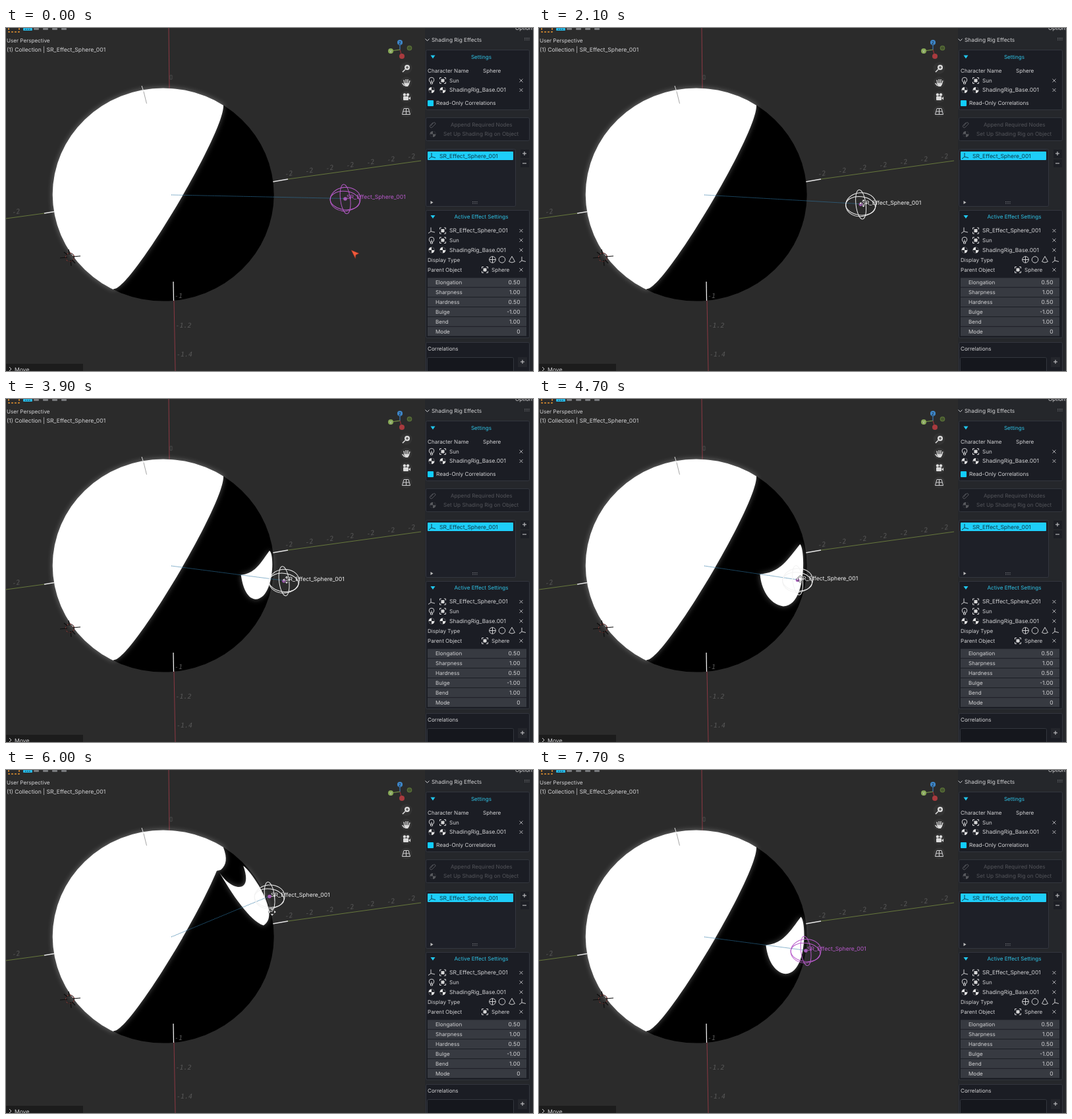
Animation, 800 px wide and 522 px high, one loop 7800 ms. Source, as an HTML page:

```html
<!DOCTYPE html>
<html lang="en">
<head>
<meta charset="utf-8">
<title>Shading rig viewport</title>
<style>
html, body { margin: 0; width: 100%; height: 100%; overflow: hidden; background: #2b2b2b; }
svg { display: block; width: 800px; height: 522px; }
text { font-family: Inter, "Open Sans", sans-serif; fill: #d2d2d4; text-rendering: geometricPrecision; white-space: pre; }
.tick { font: italic 10px "DejaVu Sans Mono", monospace; fill: #575757; }
.line { fill: none; stroke: #d0d0d2; stroke-width: 1; }
.dim { opacity: .3; }
.title { fill: #2fc3e6; text-anchor: middle; }
.dark { fill: #0b3947; }
.glow { filter: drop-shadow(0 0 4px rgba(255, 255, 255, .35)); }
</style>
</head>
<body>
<svg id="stage" viewBox="0 0 800 522" xmlns="http://www.w3.org/2000/svg"></svg>
<script>
const LOOP = 7800, STEP = 100, GRAB = 900, DROP = 7500;
const WHITE = '#f2f2f2', MAGENTA = '#b85acb';
const PIVOT = { x: 251, y: 254 };

// --- drawing helpers, each returns markup ---
const text = (x, mid, str, size = 8.1, extra = '') =>
  `<text x="${x}" y="${mid + 2.9}" font-size="${size}" ${extra}>${str}</text>`;
const rect = (x, y, w, h, fill, extra = '') =>
  `<rect x="${x}" y="${y}" width="${w}" height="${h}" fill="${fill}" ${extra}/>`;
const path = (d, extra = '') => `<path d="${d}" class="line" ${extra}/>`;
const stroke = (d, color, width = 1, extra = '') =>
  `<path d="${d}" fill="none" stroke="${color}" stroke-width="${width}" ${extra}/>`;
const fill = (d, color) => `<path d="${d}" fill="${color}"/>`;
const disc = (x, y, r, color) => `<circle cx="${x}" cy="${y}" r="${r}" fill="${color}"/>`;
const ring = (x, y, r) => `<circle cx="${x}" cy="${y}" r="${r}" class="line"/>`;
const box = (y, h, x = 637, w = 158, color = '#1b1d24') =>
  rect(x + .5, y + .5, w - 1, h - 1, color, 'rx="2" stroke="#33363e"');

const cross = y => path(`M779.5 ${y - 2.5}l5 5m0-5l-5 5`, 'opacity=".8"');
const plus = (x, y) => path(`M${x - 3} ${y}h6m-3-3v6`);
const grip = (x, y) => stroke(`M${x} ${y}h8m-8 2.5h8`, '#7c7e82', 1.2, 'stroke-dasharray="1.2 1.2"');
const bulb = (x, y) => ring(x, y - 1, 3.8) + path(`M${x - 1.5} ${y + 3}v2h3v-2m-1.5 0v-4`);
const object = (x, y) => rect(x - 2.5, y - 2.5, 5, 5, '#d8d8d8') +
  path(`M${x - 4.5} ${y - 2}v-2.5h2.5m4 0h2.5v2.5m0 4v2.5h-2.5m-4 0h-2.5v-2.5`);
const material = (x, y) => disc(x, y, 4.5, '#e2e2e2') +
  fill(`M${x} ${y}v-4.5a4.5 4.5 0 0 1 4.5 4.5zv4.5a4.5 4.5 0 0 1-4.5-4.5z`, '#24262c');
const axes = (x, y, color = '#d0d0d2') => stroke(`M${x - 1} ${y - 5}v6l-4 3m4-3l6 1.5`, color);
const tick = (x, y, label, turn = 0) =>
  `<text class="tick" transform="translate(${x} ${y}) rotate(${turn})">${label}</text>`;

function viewport() {
  return rect(0, 0, 800, 522, '#2b2b2b') +
    stroke('M247 0L248 92', '#8c3843') + stroke('M255 414L257 522', '#8c3843') +
    stroke('M0 290L58 282M428 230L630 202', '#66773c') +
    stroke('M58 282L73 279.5M405 234L428 230', '#e8e8e8', 1.3) +
    stroke('M249 72h3v6h-3z', '#4a4a4a');
}

function sphere() {
  const lit = 'M330 118C331 162 187 402 163.500 397L150 430H50V70H330Z';
  return `<ellipse cx="238.7" cy="253.5" rx="168" ry="162"/>
    <clipPath id="ball"><ellipse cx="238.7" cy="253.5" rx="168" ry="162"/></clipPath>
    <g class="glow"><g clip-path="url(#ball)" fill="#fff">
    <path d="${lit}"/><path id="bulge"/><path id="blob"/></g></g>` +
    stroke('M206 88L209 97', '#ddd') + stroke('M209 97L213.500 115', '#a5a5a5') +
    stroke('M254 386L254.500 415', '#f0f0f0', 1.3);
}

function ticks() {
  let s = tick(10, 284, '-2', -10);
  for (let i = 0; i < 3; i++) s += tick(256 + i * 1.5, 411 + i * 44.5, i ? '-1.' + i * 2 : '-1');
  for (let x = 424; x < 620; x += 31) s += tick(x, 226 - (x - 424) * .14, '-2', -10);
  return s;
}

function cursor3d() {
  return stroke('M97 342.500a6.500 6.500 0 1 1-.1 0', '#3a2626', 1.2) +
    stroke('M97 342.500a6.500 6.500 0 1 1-.1 0', '#a8443e', 1, 'stroke-dasharray="2 4"') +
    stroke('M82 350L93 349M101 348L113 347M95 337L96 345M98 353L99 362M88 341l5 4M100 353l5 5', '#0c0c0c', 1.2);
}

function overlay() {
  let s = text(1, 19.5, 'User Perspective') + text(1, 33, '(1) Collection | SR_Effect_Sphere_001', 8.6);
  s += stroke('M4 0V6H20V0', '#e09030', 1.5, 'stroke-dasharray="3 2"');
  s += rect(26, 0, 14, 4, '#27b9e6', 'rx="1"') + stroke('M29 2h8', '#123', 1, 'stroke-dasharray="1.5 1.5"');
  for (let x = 42; x < 90; x += 14) s += rect(x, 0, 8, 3, '#77797c', 'rx="1"');

  // axis gizmo
  s += stroke('M598 33V22', '#3a78b8', 1.2) + stroke('M598 33L584 35', '#7f9f4a', 1.2) + stroke('M598 33L601 43', '#8c3238', 1.2);
  s += disc(612.5, 30.5, 3.8, '#5f7a3a') + disc(612.5, 30.5, 2.8, '#46562f') +
    disc(598, 22, 4, '#3f88cc') + disc(584, 35, 4, '#86a856') + disc(601, 43, 4, '#a83a3e');
  s += text(598, 22, 'Z', 6, 'text-anchor="middle" style="fill:#111"') + text(584, 35, 'Y', 6, 'text-anchor="middle"');

  // navigation buttons
  for (let y = 61; y < 130; y += 22) s += disc(607.5, y, 9, '#333');
  s += disc(609, 60, 4, '#dcdcdc') + stroke('M606 63l-4 4', '#dcdcdc', 1.6) + stroke('M607 60h4m-2-2v4', '#333');
  s += fill('M604 84h8v2l-2 3h-4z', '#dcdcdc') +
    stroke('M605 85l-1-6M607.2 85v-7M609.5 85l.5-7M611.5 85l1.5-5M605 88l-3.5-4', '#dcdcdc', 1.4);
  s += disc(605, 101.5, 2.2, '#dcdcdc') + disc(610, 101.5, 2.2, '#dcdcdc') +
    rect(603, 104, 8, 6, '#dcdcdc', 'rx="1"') + fill('M611 107l3-2.5v5z', '#dcdcdc');
  s += path('M604 122.5h7l2.5 9h-12zM602.8 127h9.6M607.5 122.5v9');

  return s + rect(0, 511, 117, 11, '#1c1c1c') + path('M5 516l3 3-3 3') + text(13, 520, 'Move', 8.6);
}

function panel() {
  const name = 'SR_Effect_Sphere_001', base = 'ShadingRig_Base.001';
  const title = (y, label) => fill(`M644.5 ${y - 2.5}h7l-3.5 5z`, '#20c8f0') + text(721.5, y, label, 8.1, 'class="title"');
  const sun = y => bulb(646, y) + object(663, y) + text(673, y, 'Sun') + cross(y);
  const mat = y => material(646, y) + material(663, y) + text(673, y, base, 8.5) + cross(y);

  let s = rect(636, 0, 164, 522, '#25272b') + text(773, 0, 'Options', 8.2);
  s += path('M636.5 16.5l3 3 3-3') + text(646, 18.5, 'Shading Rig Effects', 8.3) + grip(787, 15.5);

  s += box(33, 92) + title(44, 'Settings');
  s += text(640, 65, 'Character Name') + text(724, 65, 'Sphere') + sun(80) + mat(94.5);
  s += rect(640, 110, 9, 9, '#12cdff', 'rx="1"') + text(653, 114.5, 'Read-Only Correlations', 8.2);

  s += box(136, 36) + '<g class="dim">' + text(675, 147, 'Append Required Nodes') +
    text(664, 161.5, 'Set Up Shading Rig on Object', 8.2) +
    path('M645 149l4-5a2 2 0 0 1 3 2l-5 5a2 2 0 0 1-3-3l4-4') + material(648, 161.5) + '</g>';

  s += box(184, 88, 637, 137, '#1e2028') + rect(640, 188, 130, 13, '#1ecefa', 'rx="1"');
  s += axes(647, 195, '#0c3d4c') + text(658, 195, name, 8.5, 'class="dark"');
  s += rect(781, 185, 13, 13, '#1d1f25') + rect(781, 200, 13, 12, '#1d1f25') + plus(787, 191) + path('M784 206h6');
  s += fill('M644.5 263v5l4-2.5z', '#bbb') + grip(708, 264.5);

  s += box(277, 195) + title(287.5, 'Active Effect Settings');
  s += axes(646, 308.5) + object(663, 308.5) + text(673, 308.5, name, 8.5) + cross(308.5) + sun(323) + mat(338);
  s += text(640, 353, 'Display Type') + ring(738.5, 352.5, 4.8) + path('M733.5 352.5h10m-5-5v10') + ring(753, 352.5, 4.8);
  s += path('M763.5 355.5l4.5-8 4.5 8q-4.5 3-9 0z') + axes(784, 353);
  s += text(640, 368, 'Parent Object') + object(727, 368) + text(737, 368, 'Sphere') + cross(368);

  const sliders = { Elongation: '0.50', Sharpness: '1.00', Hardness: '0.50', Bulge: '-1.00', Bend: '1.00', Mode: '0' };
  Object.entries(sliders).forEach(([label, value], i) => {
    const y = 387.5 + i * 14.9;
    s += rect(640, y - 7.2, 150, 13.9, '#373a41') + text(652, y, label) + text(780.5, y, value, 8.5, 'text-anchor="end"');
  });

  s += box(478, 60) + text(640, 488, 'Correlations') + box(501, 40, 639, 132, '#15171d');
  return s + rect(777, 501, 14, 15, '#24262c') + plus(784, 508);
}

const handle = `
  <path id="link" fill="none" stroke="#2e78a6" stroke-dasharray="1.2 1"/>
  <g id="rig"><g id="rings" fill="none" stroke-width="1">
    <ellipse cy="1" rx="23" ry="18" transform="rotate(-5)"/>
    <ellipse cy="3" rx="22.5" ry="14" transform="rotate(7)"/>
    <ellipse cy=".8" rx="7.5" ry="22.5" transform="rotate(-7)"/></g>
    ${disc(0, .5, 2.8, '#a45bb8')}
    ${text(2, -2, 'SR_Effect_Sphere_001', 8.6, 'id="tag"')}</g>`;
const pointers = `
  <path id="arrow" d="M0 0L12 5 7 7.5 6.5 13z" fill="#f25a3c" stroke="#7a2a1c" stroke-width=".6"/>
  <path id="mover" d="M0-6l2.6 3h-5.2zM0 6l2.6-3h-5.2zM-6 0l3-2.6v5.2zM6 0l-3-2.6v5.2z" fill="#fff" stroke="#222" stroke-width=".5"/>`;

document.getElementById('stage').innerHTML =
  viewport() + sphere() + ticks() + cursor3d() + handle + overlay() + panel() + pointers;

// --- motion: the dragged handle drives everything else ---
const route = [
  { t: GRAB, x: 515, y: 259.5 },
  { t: 1300, x: 517, y: 252.5 },
  { t: 2900, x: 460, y: 283 },
  { t: 3900, x: 422, y: 276.3 },
  { t: 4700, x: 392.5, y: 275 },
  { t: 6000, x: 400, y: 192 },
  { t: DROP, x: 405, y: 274.5 }
];
const mix = (a, b, u) => a + (b - a) * u;
const clamp = u => Math.min(1, Math.max(0, u));

function rigAt(t) {
  const i = Math.max(1, route.findIndex(k => k.t > t));
  const [a, b] = t >= DROP ? route.slice(-2) : [route[i - 1], route[i]];
  const u = clamp((t - a.t) / (b.t - a.t));
  return { x: mix(a.x, b.x, u), y: mix(a.y, b.y, u) };
}

// Crescent in polar-like axes: along the link and across it. It grows as the
// handle nears the sphere, and its inner tip swings up as the link is lifted.
function crescent(angle, r, lift) {
  const tip = 140 - .0187 * r * r + 6 * lift;
  const top = 154 - .0052 * r * r;
  const low = 142 - .005 * r * r + 5 * lift;
  const cos = Math.cos(angle), sin = Math.sin(angle);
  const at = (along, across) => [
    PIVOT.x + along * cos - across * sin,
    PIVOT.y + along * sin + across * cos
  ].map(v => v.toFixed(2)).join(' ');
  const start = at(tip, -67 * lift);
  return `M${start}
    C${at(mix(tip, top, .56) - 18 * lift, -.12 * r - 26 * lift)} ${at(mix(tip, top, .72) + 8 * lift, -.53 * r + 16 * lift)} ${at(top, -r - 11 * lift)}
    C${at(top + 9, -.9 * r)} ${at(low + .65 * r, .7 * r)} ${at(low, .8 * r)}
    C${at(mix(tip, low, .48), .8 * r - 14 * lift)} ${at(tip + 5, .4 * r - 44 * lift)} ${start}Z`;
}

const el = {};
for (const id of ['blob', 'bulge', 'link', 'rig', 'rings', 'tag', 'arrow', 'mover']) el[id] = document.getElementById(id);
const set = (id, name, value) => el[id].setAttribute(name, value);
const show = (id, on) => el[id].style.display = on ? '' : 'none';
const move = (id, x, y) => set(id, 'transform', `translate(${x} ${y})`);

function draw(t) {
  const { x, y } = rigAt(t);
  const angle = Math.atan2(y - PIVOT.y, x - PIVOT.x);
  const reach = Math.hypot(x - PIVOT.x, y - PIVOT.y);
  const lift = clamp(-angle / .394), r = 6.2 * Math.sqrt(Math.max(0, 219 - reach));
  const grabbed = t >= GRAB && t < DROP, color = grabbed ? WHITE : MAGENTA;

  move('rig', x, y);
  set('link', 'd', `M${PIVOT.x} ${PIVOT.y}L${x} ${y}`);
  set('rings', 'stroke', color);
  el.tag.style.fill = color;

  set('blob', 'd', crescent(angle, r, lift));
  show('blob', r > 0);
  const w = lift ** 3;
  set('bulge', 'd', `M330 118C${327 + 9 * w} 134 ${323 + 12 * w} 144 ${321 + 5 * w} 152L318 154Z`);
  show('bulge', w > 0);

  const near = clamp((t - 200) / (GRAB - 200));
  move('arrow', mix(524, x + 4, near), mix(338, y - 5, near));
  show('arrow', t < GRAB);
  move('mover', x + 4, y - 1 + 25 * lift);
  show('mover', grabbed);
}

const start = performance.now();
function frame() {
  const t = (performance.now() - start) % LOOP;
  draw(Math.floor(t / STEP) * STEP);
  requestAnimationFrame(frame);
}
frame();
</script>
</body>
</html>
```
